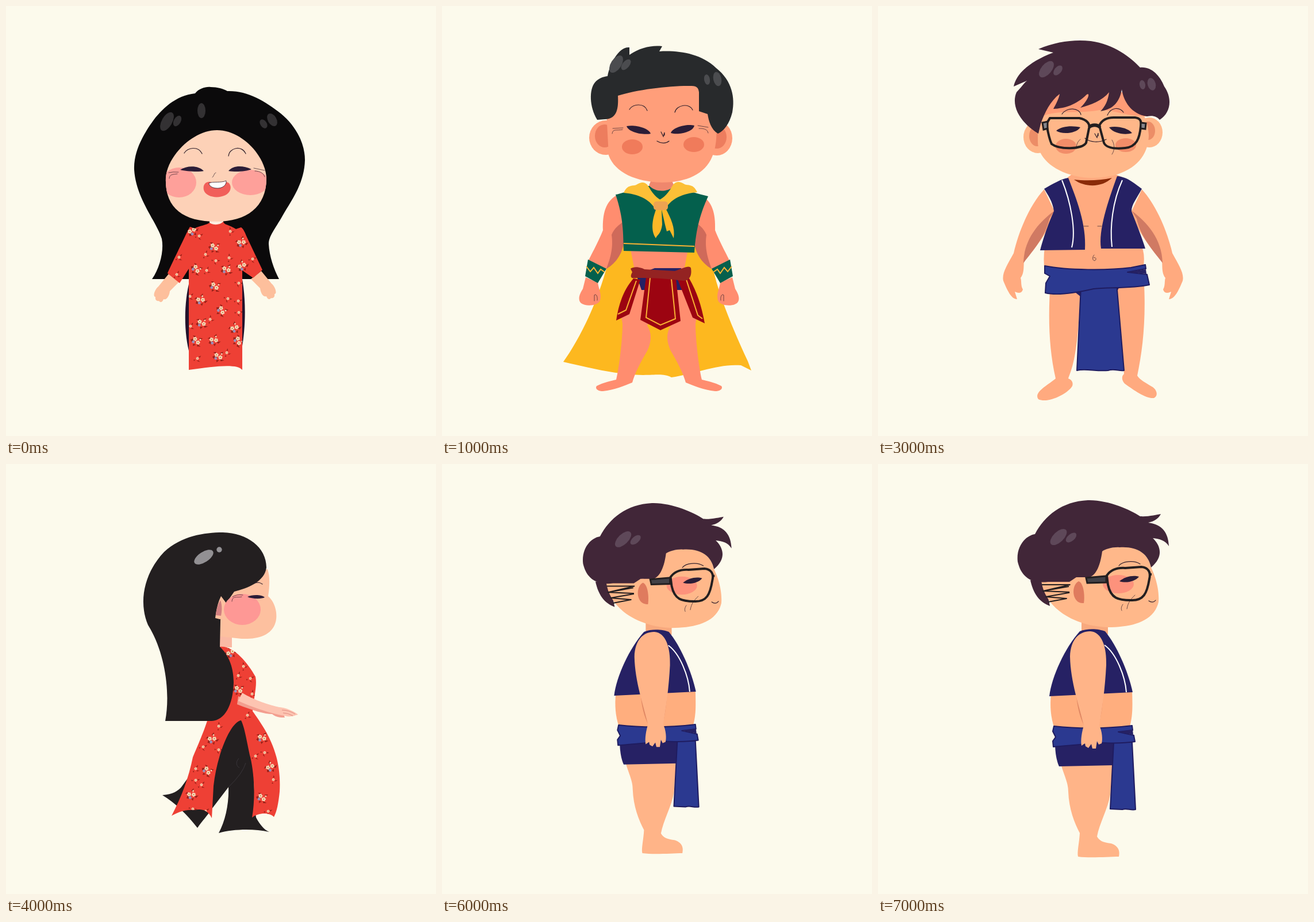
Recreate the animation shown at these times as an HTML page. Size 748x748 px, loop 8000 ms.

```html
<!DOCTYPE html>
<html lang="en">
<head>
<meta charset="utf-8">
<title>Characters</title>
<style>
html, body { margin: 0; width: 100%; height: 100%; overflow: hidden; background: #fcfaec; }
svg { display: block; width: 100%; height: 100%; }
.pose { visibility: hidden; animation: show 8s step-end infinite; animation-delay: calc((var(--slot) - 8) * 1s); }
@keyframes show { 0% { visibility: visible; } 12.5% { visibility: hidden; } }
.ln { fill: none; stroke: #30202c; stroke-width: 1.2; stroke-linecap: round; }
.fine { stroke-width: .7; }
.gold { fill: none; stroke: #f9b233; stroke-width: 2; }
.rim { fill: none; stroke: #231f20; stroke-width: 4; stroke-linejoin: round; }
.thick { stroke-width: 6; }
.eye { fill: #2b1d37; }
.red { fill: #ee4035; }
.sash { fill: #2b3990; stroke: #1f1c60; stroke-width: 2; stroke-linejoin: round; }
.navy { fill: #262164; }
.skin { fill: #ff8d6f; }
.green { fill: #04604d; }
.plum { fill: #412638; }
</style>
</head>
<body>
<svg viewBox="0 0 748 748">
<defs>
  <g id="blossom">
    <g fill="#f6d8b9"><circle cy="-2.6" r="2"/><circle cx="2.5" cy="-.8" r="2"/><circle cx="1.6" cy="2.2" r="2"/><circle cx="-1.6" cy="2.2" r="2"/><circle cx="-2.5" cy="-.8" r="2"/></g>
    <circle r="1.2" fill="#b98a3c"/>
  </g>
  <g id="sprig">
    <path d="M-4 2l-3 1 2 2zM2-3l4-2-2 4zM1 3l4 3-5-1z" fill="#9a2219"/>
    <use href="#blossom" transform="scale(.55)"/>
  </g>
  <g id="cluster">
    <path d="M-10 2l5-4 3 4-5 3zM3-6l6-2-3 5zM4 5l7 2-6 2zM-3 7l1 4 4-4zM-9-6l5-1 1 4z" fill="#9a2219"/>
    <circle cx="-4" cy="4" r="2.4" fill="#9b8fb9"/>
    <use href="#blossom" transform="translate(-3 -2)scale(.8)"/><use href="#blossom" transform="translate(4 2)scale(.8)"/>
    <circle cx="6" cy="-4" r="1.4" fill="#f6d8b9"/>
  </g>
  <clipPath id="roundFace"><path id="faceShape" d="M278 299C280 262 324 216 367 216C411 216 452 262 453 300C453 350 418 375 366 375C306 375 276 350 278 299Z"/></clipPath>
  <clipPath id="frontGown"><path id="gownFront" d="M354 377C362 382 372 381 378 375C379 381 388 380 400 388L409 385C414 389 416 395 419 402L446 459L430 473L411 460V633C403 622 365 626 318 633V457L302 482L281 465C285 455 312 400 316 391L320 384L328 387C336 382 350 381 354 377Z"/></clipPath>
  <clipPath id="sideGown"><path id="gownSide" d="M372 318C395 315 420 345 434 370C437 385 432 400 429 430C450 460 480 500 476 570C474 590 471 605 466 614C458 606 440 606 428 615C434 580 432 540 425 510C420 490 416 460 409 446C391 448 367 505 361 560L358 616C350 600 338 600 328 602C310 600 295 608 288 612C305 580 318 545 325 510C340 475 348 455 352 440L375 400Z"/></clipPath>
  <linearGradient id="capeFade" x1="0" y1="1" x2=".55" y2=".3"><stop offset=".25" stop-color="#fbb066"/><stop offset="1" stop-color="#f59c0d"/></linearGradient>
</defs>

<g class="pose" style="--slot:0">
  <path fill="#0b0a0b" d="M254 475C268 455 275 425 271 405C262 375 226 335 223 285C222 265 229 245 237 230C250 205 280 157 329 152C336 143 348 140 356 141C368 141 378 144 385 148C420 147 450 165 478 187C505 209 520 240 520 268C519 310 495 340 481 365C468 388 457 400 457 414C458 435 466 458 475 475Z"/>
  <g fill="#333133">
    <ellipse rx="9" ry="18" transform="translate(280 201)rotate(30)"/><ellipse rx="6" ry="10" transform="translate(298 200)rotate(30)"/>
    <ellipse cx="340" cy="182" rx="7" ry="13"/><ellipse rx="7.5" ry="12" transform="translate(463 198)rotate(-30)"/><ellipse rx="5.5" ry="8.5" transform="translate(448 205)rotate(-35)"/>
  </g>
  <path fill="#24132c" d="M320 476C309 515 309 570 320 607ZM410 470C418 510 417 560 410 597Z"/>
  <path id="slimHand" fill="#fdbf9c" d="M283 466L301 480L285 496C284 505 279 512 274 510C272 516 268 516 266 513C262 514 259 511 260 506C255 506 258 494 265 488Z"/>
  <use href="#slimHand" transform="translate(727 -5)scale(-1 1)"/>
  <path fill="#fdeee0" d="M354 373H378V383H354Z"/>
  <use href="#gownFront" class="red"/>
  <g id="frontPrint" clip-path="url(#frontGown)"></g>
  <use href="#faceShape" fill="#fdd1b7"/>
  <g clip-path="url(#roundFace)" fill="#fea09a"><ellipse cx="301" cy="307" rx="30" ry="26"/><ellipse cx="425" cy="307" rx="32" ry="22"/></g>
  <path class="eye" d="M303 285C315 277 335 277 344 287C335 289 315 288 303 285M387 287C395 277 412 277 427 284C417 288 400 289 387 287"/>
  <path class="ln" d="M310 256C315 246 335 243 341 257M387 261C388 247 410 241 417 257"/>
  <path class="ln fine" d="M359 298C362 296 362 290 365 290M283 290Q290 288 300 289M284 300C284 292 292 293 298 292M431 282L450 286M433 287C440 287 448 290 450 297"/>
  <path fill="#f15f5a" d="M344 320C342 310 348 305 356 306C362 311 376 311 382 306C390 306 392 315 390 320C385 336 349 337 344 320Z"/>
  <path fill="#fff" stroke="#30202c" stroke-width=".8" d="M353 308C360 305 374 308 383 304C384 312 376 317 368 317C359 317 353 313 353 308Z"/>
</g>

<g class="pose" style="--slot:1">
  <path fill="#fdb81f" d="M306 395L285 460C265 530 235 585 211 619C260 630 300 641 350 642C375 642 385 639 399 646C440 640 480 622 520 625L538 634L532 618C505 560 480 500 470 450L440 390Z"/>
  <g id="heroLimbs">
    <path class="skin" d="M312 540L328 485H376V520L357 556C366 570 364 585 357 600C345 620 335 640 331 655C318 660 300 668 280 670C270 670 266 665 269 661C280 655 295 652 303 650C308 630 314 580 314 553Z"/>
    <path class="skin" d="M304 329C285 340 279 360 280 390C270 415 258 435 254 445L286 458C300 440 305 410 316 390V350Z"/>
    <path fill="#cf6a5a" d="M315 375C310 380 300 385 295 398C299 425 290 445 286 457C303 448 316 428 317 405Z"/>
    <path class="skin" d="M250 472L271 481C273 495 278 500 275 512C272 522 250 523 242 517C235 510 240 500 245 492Z"/>
    <path class="green" d="M254 441L286 457L271 482L249 470Z"/>
    <path class="gold" d="M251 453L258 462L264 455L271 465L276 458L283 463"/>
    <path class="ln fine" d="M265 513V503C268 500 271 505 270 512"/>
  </g>
  <use href="#heroLimbs" transform="translate(755 0)scale(-1 1)"/>
  <path class="skin" d="M328 423H428L420 465H336Z"/>
  <path class="navy" d="M338 468L370 456H416L418 494H347Z"/>
  <path fill="#9c0411" d="M333 474L345 476L326 536L303 547C307 520 315 495 333 474ZM355 472L407 474L415 548L380 564L345 546ZM410 476L430 474C445 500 452 525 457 552L436 542Z"/>
  <path class="gold" d="M338 478L320 529L306 536M362 473L355 542L380 555L406 544L399 475M425 476L445 538L453 544"/>
  <path fill="#942322" d="M328 457C335 451 350 456 352 458L405 461C420 456 430 450 433 456C436 475 425 478 420 478C390 474 370 473 340 473C329 475 326 472 331 463Z"/>
  <path class="green" d="M302 328C320 325 345 312 355 313H405C425 320 445 327 463 331C450 360 442 385 439 429L316 426C315 395 316 370 302 328Z"/>
  <path class="gold" d="M316 413L439 418"/>
  <path fill="#ef876d" d="M365 300H398L404 313C392 325 370 324 360 312Z"/>
  <path id="scarfHalf" fill="#fcc037" d="M316 325C323 309 333 314 338 311C350 303 356 308 360 315C368 330 378 337 387 341L371 353C360 335 340 327 316 325Z"/>
  <use href="#scarfHalf" transform="translate(760 -1)scale(-1 1)"/>
  <path fill="#fdb827" d="M373 352C364 375 364 393 372 404C374 398 381 397 383 380L382 354ZM382 354C386 372 389 385 391 392L396 390L403 404C406 385 398 370 389 352Z"/>
  <rect x="368" y="340" width="25" height="15" rx="5" fill="#eda351"/>
  <g fill="#ff9e7a"><ellipse cx="285" cy="229" rx="29" ry="30"/><ellipse cx="478" cy="230" rx="27" ry="30"/></g>
  <g fill="#ed7d5e"><ellipse cx="283" cy="226" rx="17" ry="20"/><ellipse cx="478" cy="228" rx="17" ry="20"/></g>
  <path fill="#ff9e7a" d="M286 185L300 130H450L475 190C480 220 477 247 470 262C458 292 425 307 383 307C338 306 301 290 290 260Z"/>
  <path fill="#282a2c" d="M270 198C256 175 256 145 266 133C272 126 280 123 288 122C292 100 308 70 326 72V85C345 72 365 68 383 70L378 79C410 77 450 82 477 108C505 130 510 160 505 185C500 205 490 218 480 222C468 215 464 200 462 188L447 183V150C446 143 444 139 434 139C400 138 340 145 306 156C307 175 306 197 283 197Z"/>
  <g fill="#4b4c4f"><ellipse rx="9" ry="17" transform="translate(303 101)rotate(33)"/><ellipse rx="6" ry="11" transform="translate(320 102)rotate(40)"/><ellipse rx="5" ry="9" transform="translate(461 128)rotate(-10)"/><ellipse rx="7" ry="12.5" transform="translate(479 127)rotate(-12)"/></g>
  <g fill="#f07b5b"><ellipse cx="331" cy="245" rx="18" ry="13"/><ellipse cx="438" cy="241" rx="18" ry="13"/></g>
  <path class="eye" d="M321 209C335 206 360 212 363 222C350 225 325 220 321 209M398 221C400 212 425 204 439 208C437 219 412 225 398 221"/>
  <path class="ln" d="M326 180C332 170 352 168 357 182M405 185C408 172 430 168 436 181M381 219L385 227L387 220V225M374 235C382 240 390 239 395 235"/>
  <path class="ln fine" d="M296 222C297 213 303 217 314 215M297 213L315 212M445 208L463 211M447 213C455 213 462 214 463 221"/>
</g>

<g class="pose" style="--slot:3"><g id="scholarFront">
  <path fill="#ffaa7f" d="M299 495C296 550 298 600 309 648C295 660 270 672 279 684C295 692 330 675 338 661C340 655 337 650 331 648C340 625 348 600 352 495ZM414 485L428 640C422 645 425 655 432 659C445 668 465 683 480 682C488 678 485 668 478 663C465 655 455 650 451 643C460 600 466 550 463 485ZM330 298L341 290H407L425 298L461 425Q465 440 460 463H290Q287 440 290 420Z"/>
  <path fill="#8a2b08" d="M341 302C360 316 390 316 407 299C385 304 360 304 341 302Z"/>
  <g id="scholarArm">
    <path fill="#ffaa7f" d="M289 319C265 345 245 390 236 430C225 450 215 465 218 478C225 495 232 510 242 510L238 497C245 500 250 500 252 493C248 487 250 478 248 473C255 465 253 450 254 445C270 425 300 390 307 357Z"/>
    <path fill="#d07a63" d="M307 356C280 376 254 405 253 447C270 425 292 400 298 370Z"/>
  </g>
  <use href="#scholarArm" transform="translate(748 0)scale(-1 1)"/>
  <path class="navy" d="M289 318C303 310 320 300 331 299C345 335 363 380 360 424L282 425C290 395 300 370 306 357C304 340 295 328 289 318ZM416 296C435 297 450 312 459 318C450 335 441 345 441 357C450 380 460 405 465 422H388C383 390 400 340 416 296Z"/>
  <path fill="none" stroke="#fff" stroke-width="2" d="M320 303C335 340 345 390 337 420M425 303C408 340 403 385 407 419"/>
  <path class="ln fine" d="M358 383H366M382 383H389M376 433C372 437 373 443 377 443C381 441 379 436 375 438"/>
  <path class="navy" d="M343 498L353 488V506ZM413 486L422 485L416 496Z"/>
  <path class="sash" d="M353 488L415 482L428 634C420 636 412 630 400 634C380 636 360 630 346 634Z"/>
  <path class="sash" d="M290 452C330 460 400 460 440 455L465 450L466 457L434 463L468 467L472 485C440 492 400 489 375 492C340 500 310 504 291 499L292 482L299 470L290 465Z"/>
  <path class="navy" d="M434 463L466 458L467 466Z"/>
  <g fill="#ffb789"><ellipse cx="278" cy="228" rx="25" ry="28"/><ellipse cx="472" cy="220" rx="23" ry="26"/></g>
  <g fill="#ec8d67"><ellipse cx="277" cy="226" rx="14" ry="18"/><ellipse cx="470" cy="217" rx="12" ry="16"/></g>
  <path fill="#ffb789" d="M278 215C280 180 300 165 340 150H420C460 170 470 200 471 225C470 272 430 299 372 299C320 298 277 270 278 235Z"/>
  <path fill="#ff9c76" d="M300 150H425C435 175 445 185 470 192C430 192 410 180 385 181C350 188 310 180 286 192Z"/>
  <path class="plum" d="M279 222C250 205 230 175 241 150C248 143 255 133 259 130L236 140C240 120 260 98 305 81L279 75C310 62 340 58 370 61C410 66 440 90 456 107C475 105 490 120 498 140C512 160 510 185 490 198C485 192 478 190 468 192C440 188 427 165 424 145C421 165 410 180 387 183C395 175 400 165 402 150C390 165 370 172 352 177C365 165 370 150 363 154C345 172 325 178 305 179C310 170 315 160 316 153C300 165 290 185 283 205Z"/>
  <g fill="#5e4859"><ellipse rx="9" ry="17" transform="translate(293 110)rotate(40)"/><ellipse rx="6" ry="10" transform="translate(313 112)rotate(40)"/><ellipse rx="5" ry="8" transform="translate(460 137)rotate(-10)"/><ellipse rx="7" ry="11" transform="translate(476 136)rotate(-15)"/></g>
  <g fill="#f28d69"><ellipse cx="327" cy="244" rx="18" ry="13"/><ellipse cx="431" cy="242" rx="18" ry="12"/></g>
  <path class="eye" d="M310 217C320 208 340 208 352 211C345 222 320 224 310 217M402 211C415 208 435 212 442 221C430 225 410 222 402 211"/>
  <path class="ln" d="M320 188C328 176 350 176 353 189M399 190C405 176 420 175 427 185M377 222L381 229L383 221V226M360 230C370 238 385 238 397 232"/>
  <path class="ln fine" d="M345 248C345 240 348 235 352 232M407 233C412 241 412 251 407 258"/>
  <path class="rim" d="M299 195H350C362 197 370 205 367 213L362 238C355 250 315 250 302 240C297 230 294 210 293 205ZM385 208C390 197 400 194 410 194H447C456 195 459 200 457 210C455 230 450 245 430 247C410 249 397 247 393 238Z"/>
  <path class="rim thick" d="M367 211C372 206 382 206 386 211"/>
  <path fill="#85858b" stroke="#231f20" stroke-width="3" d="M286 203L295 201V213L288 215ZM457 203L466 204L465 214L457 213Z"/>
</g></g>

<g class="pose" style="--slot:4">
  <path fill="#231f20" d="M385 460C398 444 410 444 412 448L428 500C432 540 432 590 435 615C442 628 450 637 458 640C430 634 395 635 370 642C382 620 388 590 387 562L358 600C350 612 342 620 333 633C315 610 295 590 272 576C290 575 300 568 305 562L350 500Z"/>
  <path fill="none" stroke="#39353a" d="M405 512C398 520 402 527 406 528M387 562Q412 538 417 520"/>
  <path fill="#fab9a4" d="M371 296H393V319H371Z"/>
  <use href="#gownSide" class="red"/>
  <g id="sidePrint" clip-path="url(#sideGown)"></g>
  <path fill="#fdc09f" d="M455 183C459 195 459 210 456 230C468 240 473 260 469 275C462 300 435 305 410 304L372 300V230L383 220L397 200Z"/>
  <path fill="#231f20" d="M377 119C420 120 453 145 453 180C450 205 420 216 397 222L383 242L374 230L372 318C385 330 396 350 396 380C395 420 380 446 358 447H277C286 400 278 330 247 280C230 240 240 190 275 153C305 125 345 119 377 119Z"/>
  <g fill="#929093"><ellipse rx="19" ry="9" transform="translate(344 162)rotate(-33)"/><circle cx="371" cy="149" r="4.7"/></g>
  <path fill="#fdc09f" d="M374 230L383 242C383 256 380 268 372 270L364 268C366 250 370 238 374 230Z"/>
  <path fill="#d27f80" d="M373 237C376 245 376 255 374 264L365 263C366 252 369 243 373 237Z"/>
  <ellipse cx="411" cy="253" rx="32" ry="27" fill="#fe9895"/>
  <path class="eye" d="M420 231C428 227 445 227 450 232C445 235 428 235 420 231"/>
  <path class="ln" d="M433 207C440 205 443 207 446 209"/>
  <path class="ln fine" d="M393 239C394 228 402 233 410 231M394 231Q401 226 412 228"/>
  <path fill="#f39e8f" d="M404 404L402 418C430 429 450 435 463 435C470 441 478 441 485 441L480 428Z"/>
  <path fill="#fdc4b1" d="M411 398C430 410 460 420 475 423C490 424 505 433 508 436C500 438 495 441 485 438C470 436 440 428 404 412Z"/>
  <path fill="none" stroke="#e08a80" d="M480 428Q492 428 503 435M482 433Q490 433 499 438"/>
</g>

<g class="pose" style="--slot:5">
  <path fill="url(#capeFade)" d="M350 322L367 328C362 400 345 470 320 520C300 560 275 588 248 599C240 580 190 562 137 565C140 540 180 500 270 481C315 440 345 370 350 322Z"/>
  <g class="skin" stroke="#db755f" stroke-width=".8">
    <path d="M345 530C330 555 335 580 337 597C330 615 316 630 315 640C330 648 355 660 372 668C382 670 388 662 383 656C370 650 358 635 355 622C375 605 400 580 405 540Z"/>
    <path d="M434 540C430 575 450 600 465 620C466 635 466 650 472 658C490 660 500 654 515 652C530 652 540 652 539 643C525 637 510 640 490 625C495 600 500 560 487 515L440 525Z"/>
    <path d="M363 400H457L452 442L364 438Z"/>
  </g>
  <path fill="none" stroke="#cf6a5a" d="M378 407V435"/>
  <path class="green" d="M367 328L450 310C465 330 470 370 462 403L358 408Z"/>
  <path class="gold" d="M360 394L462 392"/>
  <path fill="#741110" d="M368 445L465 445C485 470 492 500 488 515C460 525 380 525 346 533C350 500 360 470 368 445Z"/>
  <path fill="#8f2d2b" d="M368 446H380L362 520L346 533C350 500 358 470 368 446ZM393 445L384 525L421 555L460 533V500L440 445Z"/>
  <path class="gold" d="M374 448C367 475 364 500 361 515L347 529M402 445L391 522L420 541L452 526L448 465"/>
  <path fill="#7e2021" d="M365 436C385 432 440 432 468 440V452C440 446 390 446 367 448Z"/>
  <path fill="#7e2021" d="M468 490L480 505L483 553C474 540 470 520 468 490Z"/>
  <path class="skin" d="M388 297C410 285 445 300 445 335C445 365 450 400 452 425L405 434C403 410 398 390 388 375C375 350 362 320 388 297Z"/>
  <path fill="#cf695a" d="M376 304C360 325 368 355 388 376C392 395 400 415 405 435L415 431C404 405 402 385 407 377C392 373 381 365 379 345C378 325 376 315 382 301Z"/>
  <path fill="none" stroke="#db755f" stroke-width=".8" d="M410 387Q430 389 446 380"/>
  <path class="skin" stroke="#b95545" d="M425 462C440 458 460 459 465 467L480 480C485 490 482 500 475 512C460 520 440 521 430 516C422 500 426 480 425 462ZM463 484Q470 486 476 483M468 488L472 498L477 490"/>
  <path fill="#6f100e" d="M405 433L453 419L461 448V462L425 463Z"/>
  <path class="gold" d="M411 444L423 437L431 445L442 431L448 440L457 433"/>
  <path fill="#f18c70" d="M375 262L435 282V302C420 294 400 291 380 287Z"/>
  <path fill="#fcc04a" d="M347 325C346 313 351 303 353 297C344 281 365 273 390 280L428 291L447 303Q455 310 456 319L450 331L440 318C430 300 405 290 384 294C371 302 368 315 366 329Z"/>
  <path fill="none" stroke="#eda22c" d="M353 297Q370 285 398 287M349 313Q362 300 382 295"/>
  <path fill="#fbb928" d="M445 318L457 322C460 345 456 365 451 375C446 360 441 345 445 318Z"/>
  <path fill="#ff9e79" d="M415 155C450 140 490 143 496 160C497 180 496 200 498 210C512 222 516 250 507 265C495 288 460 290 435 289C415 289 393 284 373 270L380 200Z"/>
  <path fill="#28292b" d="M302 160C310 110 350 85 390 87L420 90C427 80 437 82 441 95C450 75 467 75 480 90C500 95 515 130 511 145C508 157 500 160 494 157C485 146 460 145 425 157C407 165 424 180 423 196C410 205 405 225 401 240C390 255 350 250 330 247C300 240 285 220 291 190C294 178 300 175 302 160Z"/>
  <path fill="#231f20" d="M315 150L374 248C320 252 288 230 290 200C295 172 306 170 315 150Z"/>
  <path fill="none" stroke="#151314" stroke-width="2" d="M347 251L388 249L345 256L391 253L349 261L389 258L358 265L386 263L364 269L380 270"/>
  <ellipse cx="386" cy="224" rx="16" ry="25" fill="#ff9e79"/><ellipse cx="386" cy="229" rx="10" ry="19" fill="#d3735a"/>
  <ellipse cx="446" cy="217" rx="26" ry="15" fill="#fc8674"/>
  <path class="eye" d="M454 207C462 200 480 200 488 207C478 210 465 210 454 207"/>
  <path class="ln" d="M447 184C455 176 475 174 483 181M498 247C503 250 507 248 510 245M480 275Q480 280 483 283M488 272V282M495 266Q498 269 497 275"/>
  <path class="ln fine" d="M428 222C428 208 440 211 449 209M430 210Q440 205 455 206"/>
</g>

<g class="pose" style="--slot:7"><g id="scholarSide">
  <path fill="#ffb488" d="M318 522C325 545 331 555 331 570C332 600 342 625 351 642C350 660 346 675 348 683C370 686 400 683 419 683C422 670 415 663 405 660C390 658 385 655 381 648C385 625 400 600 404 575L408 520Z"/>
  <path class="navy" d="M308 485H410V524L315 526C310 515 308 500 308 485Z"/>
  <path fill="#ffae7e" d="M301 400L442 394C443 425 443 440 437 460H307C300 440 299 420 301 400Z"/>
  <path fill="#f8a97e" d="M354 272H400V296H354Z"/>
  <path class="navy" d="M351 291C365 285 385 287 395 291C415 315 435 360 443 397L298 404C302 370 325 320 351 291Z"/>
  <path fill="none" stroke="#fff" stroke-width="2" d="M394 315C415 330 430 370 432 397"/>
  <path class="sash" d="M410 484H442L448 601C440 603 432 598 425 601L404 600Z"/>
  <path class="sash" d="M306 456C350 461 400 460 442 455L443 463L418 466L445 472L447 483C420 487 400 485 390 485C360 487 330 490 305 492L304 482L309 475L304 465Z"/>
  <path class="navy" d="M418 466L443 462L444 471Z"/>
  <path fill="#df8763" d="M345 400C346 420 351 440 358 454L362 430ZM392 398C391 420 388 440 384 455L380 430Z"/>
  <path fill="#ffb488" d="M369 291C390 292 398 320 397 350C395 390 390 425 385 455C390 465 391 480 389 486L384 488L381 482L379 495H373L371 487L366 494L361 491L360 486L354 490C352 480 355 465 358 455C350 420 335 380 334 335C335 305 350 291 369 291Z"/>
  <path class="plum" d="M265 202C270 225 280 240 299 247L290 203Z"/>
  <path fill="#ffb88a" d="M284 203C290 250 340 282 400 284C440 284 480 275 488 240C490 215 480 190 475 180C470 155 450 143 420 143L385 150L360 195Z"/>
  <path class="plum" d="M296 205C270 208 250 200 243 170C240 145 255 125 273 122C290 90 320 65 365 63C400 62 440 80 456 91C470 92 485 88 492 87C488 95 480 100 470 102C495 105 505 120 506 143C500 133 490 130 478 129C490 140 499 160 475 180C470 155 450 143 420 145C410 144 395 148 390 152C387 175 380 193 368 197L345 197L333 205Z"/>
  <g fill="#5e4859"><ellipse rx="9" ry="18" transform="translate(314 127)rotate(46)"/><ellipse rx="6" ry="11" transform="translate(336 128)rotate(50)"/></g>
  <path fill="none" stroke="#231f20" stroke-width="2" stroke-linejoin="round" d="M285 210L334 210L287 221L332 213M288 221L337 223L292 231L328 234L296 240"/>
  <ellipse cx="349" cy="220" rx="16" ry="23" fill="#ffb88a"/>
  <path fill="#df7b5e" d="M349 204C358 207 360 230 358 242C337 244 335 211 349 204Z"/>
  <ellipse cx="418" cy="209" rx="27" ry="16" fill="#fd927c"/>
  <path class="eye" d="M420 204C430 195 445 193 454 196C448 204 432 208 420 204"/>
  <path class="ln" d="M419 177C425 169 445 167 456 174M471 238C475 241 480 241 483 237"/>
  <path class="ln fine" d="M433 252C435 240 440 235 447 228M424 255C422 251 424 247 426 244"/>
  <path class="rim" d="M398 194C405 184 415 180 430 181L458 179C470 180 475 188 472 200C468 225 462 238 440 237C418 237 405 234 400 210ZM471 192L476 192"/>
  <path fill="#424147" stroke="#231f20" stroke-width="3" d="M362 198L397 195V206L364 207Z"/>
</g></g>

<g class="pose" style="--slot:2"><use href="#scholarFront" transform="translate(374 370)scale(.953)translate(-374 -374)"/></g>
<g class="pose" style="--slot:6"><use href="#scholarSide" transform="translate(374 374)scale(.982)translate(-374 -374.5)"/></g>
</svg>
<script>
// Scatter fabric motifs over a gown; each motif gets its own turn.
function scatter(layer, motif, points) {
  const marks = points.map(([x, y], i) =>
    `<use href="#${motif}" transform="translate(${x} ${y})rotate(${i * 67 % 110 - 55})"/>`);
  document.getElementById(layer).innerHTML += marks.join("");
}
scatter("frontPrint", "cluster", [[323, 391], [362, 419], [409, 411], [331, 457], [383, 458], [410, 452],
  [363, 487], [338, 511], [375, 529], [340, 551], [397, 560], [331, 582], [361, 581], [404, 582], [369, 609]]);
scatter("frontPrint", "sprig", [[390, 392], [336, 400], [347, 432], [365, 443], [301, 437], [388, 438], [429, 440],
  [349, 460], [405, 482], [320, 505], [355, 545], [404, 513], [297, 467], [386, 509], [333, 613], [384, 603], [405, 533], [321, 557]]);
scatter("sidePrint", "cluster", [[390, 328], [404, 392], [358, 478], [350, 533], [445, 476], [459, 527], [445, 580], [322, 575]]);
scatter("sidePrint", "sprig", [[413, 352], [425, 373], [404, 368], [370, 497], [340, 558], [370, 456], [343, 492], [420, 437],
  [450, 502], [434, 508], [465, 549], [456, 604], [330, 530], [325, 600], [347, 604], [428, 400], [330, 550]]);
</script>
</body>
</html>
```
